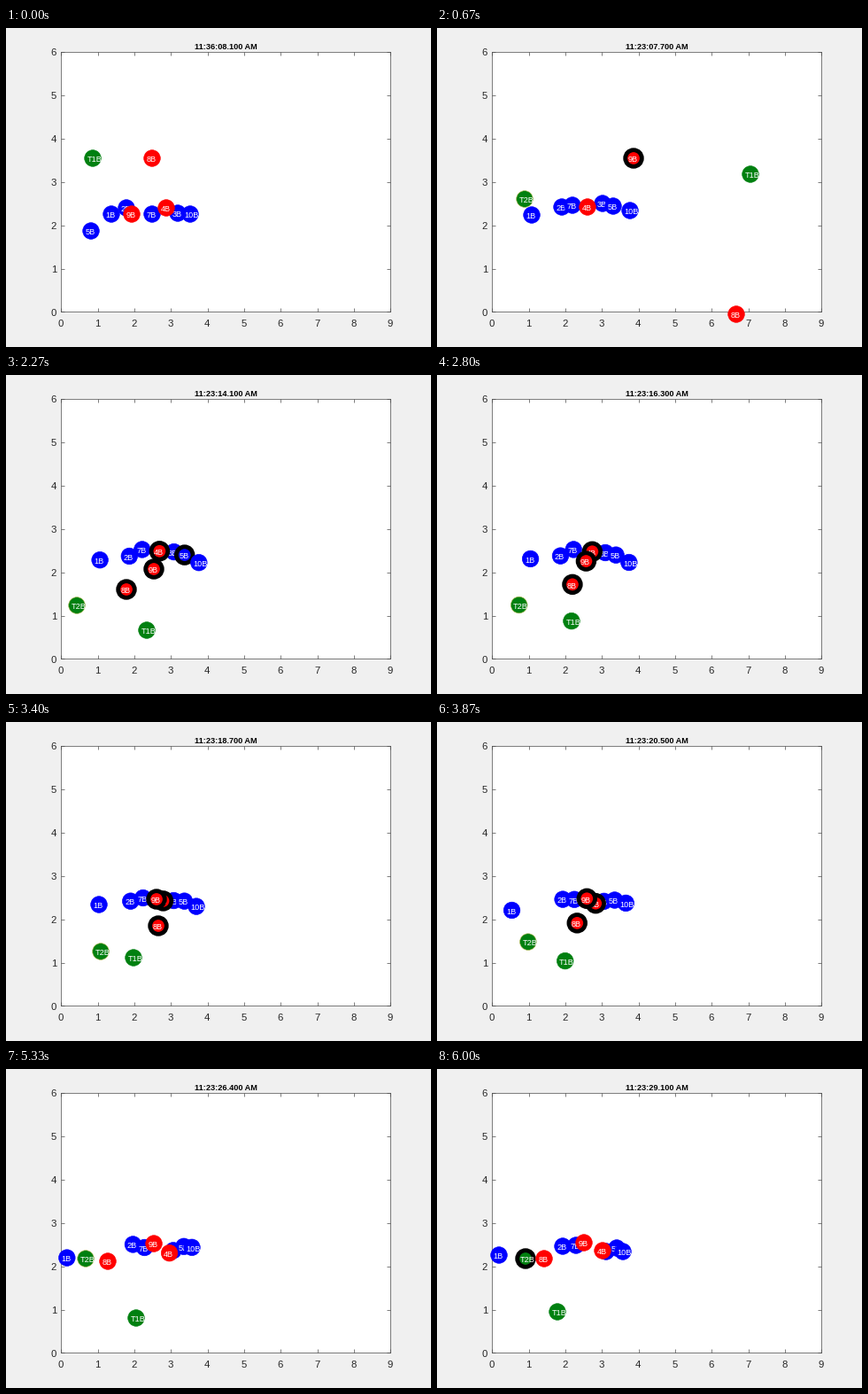
Recreate the animation shown at these times as a matplotlib script. Size 480 by 360 pixels, loop 6.07 s.

```python
import math

import numpy as np
import matplotlib.pyplot as plt
from matplotlib.animation import FuncAnimation
from matplotlib.patches import Circle

W, H = 480, 360
LOOP_MS = 6070
STEPS, SUBSTEPS = 91, 4  # poses per loop, drawn frames per pose
START, END = 20, 90      # span over which the seated group drifts
LEFT, RIGHT, TOP, BOTTOM = 62.4, 434.4, 27, 320.4
RADIUS, RING = 9.3, 4.8
INK = "#262626"
AXIS = "#4a4a4a"

plt.rcParams["font.family"] = "Liberation Sans"

# Drawing order, bottom to top
NAMES = "1B 2B 3B 5B 7B 10B T1B T2B 4B 8B 9B".split()

# Places in stage pixels during the opening moment
OPENING = {
    "1B": (119, 210), "2B": (136, 203), "3B": (194, 209), "5B": (96, 229),
    "7B": (165, 210), "10B": (208, 210), "T1B": (98, 147), "4B": (181, 203),
    "8B": (165, 147), "9B": (142, 210),
}

# Seated group: first place, last place, sway
SEATED = {
    "2B": ((141, 202), (142, 200), (-2, 3)),
    "3B": ((187, 198), (191, 206), (2, 0)),
    "4B": ((170, 202), (187, 205), (0, -4)),
    "5B": ((199, 201), (203, 202), (2, 2)),
    "7B": ((153, 200), (157, 199), (0, -3)),
    "10B": ((218, 206), (210, 206), (1.5, 6)),
}

# Wandering group: (step, x, y) waypoints
WALKS = {
    "1B": [(20, 107, 211), (51, 105, 206), (64, 67, 218), (90, 70, 210)],
    "T1B": [(1, 340, 180), (10, 354, 165), (20, 241, 232), (31, 205, 322),
            (34, 159, 288), (51, 144, 266), (80, 147, 281), (90, 136, 274)],
    "T2B": [(20, 99, 193), (34, 80, 260), (51, 107, 259), (80, 90, 214),
            (90, 100, 214)],
    "8B": [(1, 300, 300), (10, 338, 323), (20, 245, 250), (34, 136, 242),
           (51, 172, 230), (80, 115, 217), (90, 121, 214)],
    "9B": [(10, 222, 147), (20, 182, 252), (34, 167, 219), (51, 170, 200),
           (90, 166, 196)],
}

# First and last step with a black ring
RINGED = {"4B": (14, 73), "9B": (10, 73), "8B": (25, 73), "5B": (31, 38),
          "T2B": (86, 90)}


def color_of(name):
    if name.startswith("T"):
        return "#008010"
    return "#ff0000" if name in ("4B", "8B", "9B") else "#0000ff"


def position(name, step):
    if step == 0:
        return OPENING.get(name)
    if name in WALKS:
        times, xs, ys = np.transpose(WALKS[name])
        return np.interp(step, times, xs), np.interp(step, times, ys)
    u = max(0, (step - START) / (END - START))
    wave = math.sin(2 * math.pi * u)
    return tuple(a + (b - a) * u + sway * wave
                 for a, b, sway in zip(*SEATED[name]))


def clock(step):
    if step == 0:
        return "11:36:08.100 AM"
    tenths = round(104 + (step - START) * 8 / 3)
    return f"11:23:{tenths // 10:02d}.{tenths % 10}00 AM"


class Ball:
    def __init__(self, stage, name, order):
        self.name = name
        self.color = color_of(name)
        self.rim = "#a9b64c" if name == "T2B" else self.color
        self.disc = Circle((0, 0), RADIUS, facecolor=self.color, zorder=order,
                           clip_on=False)
        stage.add_patch(self.disc)
        self.label = stage.text(0, 0, name, color="white", fontsize=9.14,
                                va="baseline", zorder=order + 0.5)

    def update(self, step):
        spot = position(self.name, step)
        self.disc.set_visible(spot is not None)
        self.label.set_visible(spot is not None)
        if spot is None:
            return
        x, y = spot
        first, last = RINGED.get(self.name, (-1, -1))
        ringed = first <= step <= last
        self.disc.center = x, y
        self.disc.set_edgecolor("black" if ringed else self.rim)
        self.disc.set_linewidth(RING if ringed else 0.6)
        self.label.set_position((x - 6.5, y + 4.3))


def draw_plot(fig, stage):
    ax = fig.add_axes([LEFT / W, 1 - BOTTOM / H,
                       (RIGHT - LEFT) / W, (BOTTOM - TOP) / H], zorder=0)
    ax.set(xlim=(0, 9), ylim=(0, 6), xticks=range(10), yticks=range(7))
    ax.tick_params(direction="in", length=3.7, width=0.7, color=AXIS,
                   top=True, right=True, labelbottom=False, labelleft=False)
    for spine in ax.spines.values():
        spine.set(linewidth=0.7, edgecolor=AXIS)
    style = dict(fontsize=11.4, color=INK, va="baseline")
    for n in range(10):
        x = LEFT + n * (RIGHT - LEFT) / 9
        stage.text(x - 0.5, 337.3, str(n), ha="center", **style)
    for n in range(7):
        y = BOTTOM - n * (BOTTOM - TOP) / 6
        stage.text(57, y + 4.4, str(n), ha="right", **style)


fig = plt.figure(figsize=(W / 72, H / 72), dpi=72, facecolor="#f0f0f0")
stage = fig.add_axes([0, 0, 1, 1], zorder=1)
stage.set(xlim=(0, W), ylim=(H, 0))
stage.axis("off")
draw_plot(fig, stage)
title = stage.text(248.2, 24, "", fontsize=9.14, weight="bold", color="black",
                   ha="center", va="baseline")
balls = [Ball(stage, name, 10 + k) for k, name in enumerate(NAMES)]


def update(frame):
    step = min((frame + 1) // SUBSTEPS, STEPS - 1)
    title.set_text(clock(step))
    for ball in balls:
        ball.update(step)
    return []


frames = STEPS * SUBSTEPS
anim = FuncAnimation(fig, update, frames=frames, interval=LOOP_MS / frames,
                     repeat=True, repeat_delay=0, blit=False)
plt.show()
```
